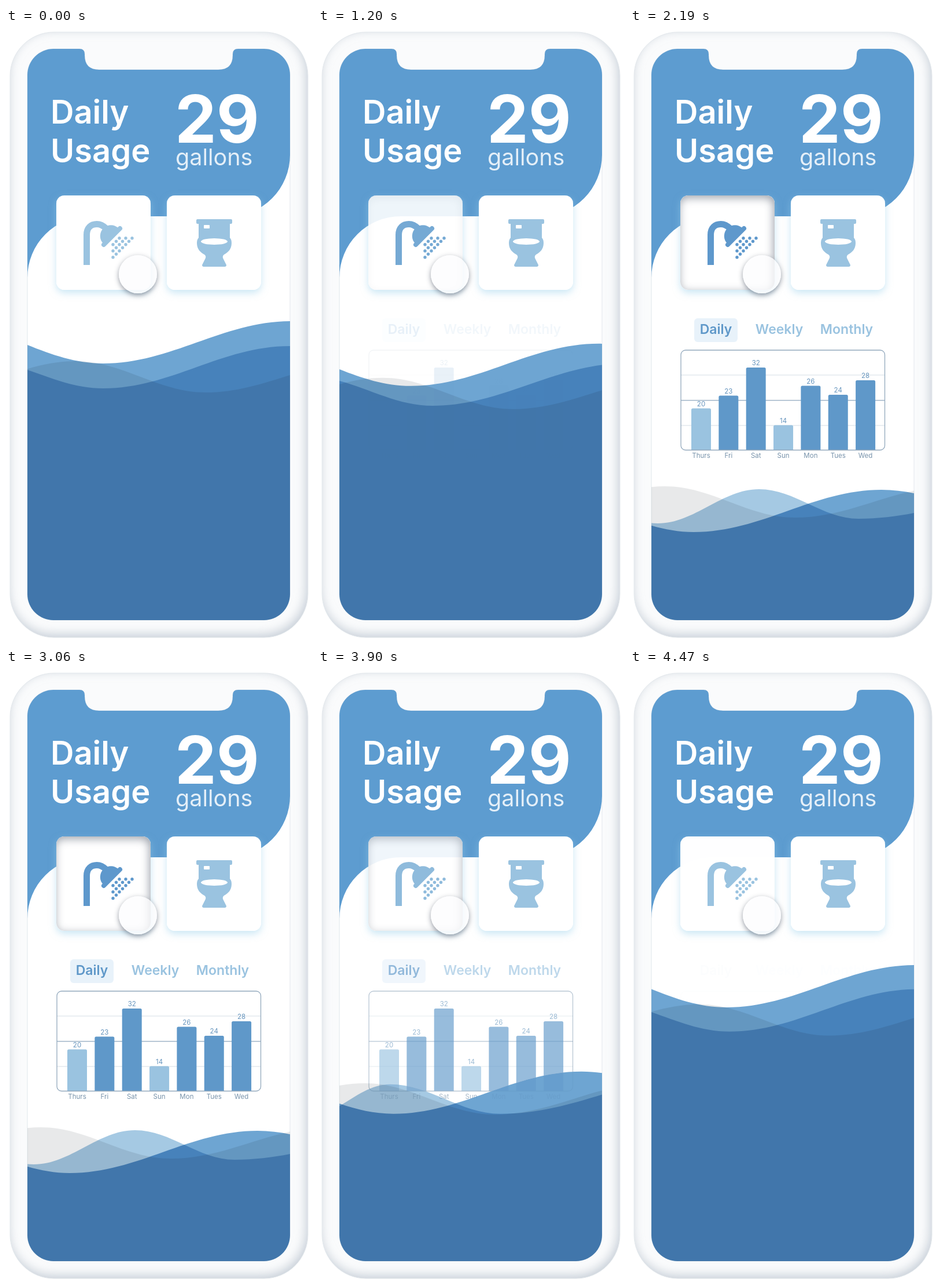
An HTML page with a canvas that plays this animation: 529 by 1058 pixels, repeating every 4.5 s.

```html
<!DOCTYPE html>
<html lang="en">
<head>
<meta charset="utf-8">
<title>Daily Usage</title>
<style>
html, body { margin: 0; width: 100%; height: 100%; overflow: hidden; background: #fff; }
canvas { display: block; width: 529px; height: 1058px; }
</style>
</head>
<body>
<canvas id="stage"></canvas>
<script>
const W = 529, H = 1058, LOOP = 4500, STEP = 30;
const FONT = 'Inter, "Liberation Sans", sans-serif';
const SKY = '#5d9cd0', DEEP = '#5f98c9', PALE = '#9ac3e0';

const canvas = document.getElementById('stage');
const ctx = canvas.getContext('2d');
const dpr = window.devicePixelRatio || 1;
canvas.width = W * dpr;
canvas.height = H * dpr;

const lerp = (a, b, k) => a + (b - a) * k;
const clamp = k => Math.max(0, Math.min(1, k));

// cubic-bezier(.42, 0, .58, 1)
function easeInOut(x) {
  x = clamp(x);
  let lo = 0, hi = 1;
  for (let i = 0; i < 24; i++) {
    const t = (lo + hi) / 2, u = 1 - t;
    if (1.26 * t * u * u + 1.74 * t * t * u + t * t * t < x) lo = t; else hi = t;
  }
  return lo * lo * (3 - 2 * lo);
}

function mix(a, b, k) {
  return `rgb(${a.map((v, i) => Math.round(lerp(v, b[i], k)))})`;
}

function roundRect(x, y, w, h, r) {
  const p = new Path2D();
  p.roundRect(x, y, w, h, r);
  return p;
}

function fill(path, color, alpha = 1) {
  ctx.save();
  ctx.globalAlpha *= alpha;
  ctx.fillStyle = color;
  ctx.fill(path);
  ctx.restore();
}

function stroke(path, color, width) {
  ctx.strokeStyle = color;
  ctx.lineWidth = width;
  ctx.stroke(path);
}

function text(str, x, y, size, color, weight = 400, align = 'left') {
  ctx.font = `${weight} ${size}px ${FONT}`;
  ctx.textAlign = align;
  ctx.fillStyle = color;
  ctx.fillText(str, x, y);
}

function setShadow(color, blur, dx, dy) {
  ctx.shadowColor = color;
  ctx.shadowBlur = blur * dpr;
  ctx.shadowOffsetX = dx * dpr;
  ctx.shadowOffsetY = dy * dpr;
}

function ring(path) {
  const p = new Path2D();
  p.rect(-200, -200, W + 400, H + 400);
  p.addPath(path);
  return p;
}

// Shadow only outside the path
function dropShadow(path, color, blur, dy) {
  ctx.save();
  ctx.clip(ring(path), 'evenodd');
  setShadow(color, blur, 0, dy);
  ctx.fillStyle = '#fff';
  ctx.fill(path);
  ctx.restore();
}

// Shadow only inside the path
function innerShadow(path, color, blur, dx, dy, alpha = 1) {
  ctx.save();
  ctx.clip(path);
  ctx.globalAlpha = alpha;
  setShadow(color, blur, dx, dy);
  ctx.fillStyle = '#fff';
  ctx.fill(ring(path), 'evenodd');
  ctx.restore();
}

const body = roundRect(7, 7, 515, 1045, 76);
const screen = new Path2D(`M82 36H127Q136 36 136 45V47Q136 72 161 72H367Q392 72 392 47V45
  Q392 36 401 36H446A45 45 0 0 1 491 81V977A45 45 0 0 1 446 1022H82A45 45 0 0 1 37 977V81A45 45 0 0 1 82 36Z`);
const header = new Path2D(`M30 30H498V219H491A106 106 0 0 1 385 325H143A106 106 0 0 0 37 431H30Z`);
const cards = [roundRect(87, 289, 163, 163, 14), roundRect(278, 289, 163, 163, 14)];
const pipe = new Path2D('M139.5 409V357C139.5 345 147 338.5 157 338.5C164 338.5 168 341 173 346');
const dome = new Path2D();
dome.arc(181.5, 359, 18.7, Math.PI * 0.75, Math.PI * 1.75);
const rim = new Path2D('M169 374L197 346');
const touch = new Path2D();
touch.arc(228, 425, 33, 0, 7);

const toilet = new Path2D(`M331 330H389Q391 330 391 332V336Q391 338 389 338H387V362Q390 365 390 371
  C390 382 384 387 377 391Q374 393 375 397L381 409Q381 412 378 412H342Q339 412 339 409L345 397
  Q346 393 343 391C336 387 330 382 330 371Q330 365 333 362V338H331Q329 338 329 336V332Q329 330 331 330Z`);
const seat = new Path2D();
seat.ellipse(360, 368.5, 23, 5.5, 0, 0, 7);

const bars = [['Thurs', 20, 656.5], ['Fri', 23, 634.5], ['Sat', 32, 586], ['Sun', 14, 685.5],
  ['Mon', 26, 617.5], ['Tues', 24, 633], ['Wed', 28, 608]];

function drawPhone() {
  fill(body, '#fafbfc');
  innerShadow(body, 'rgba(160,174,188,.6)', 18, -3, -5);
  stroke(body, '#e3e8ec', 1);
  fill(screen, '#fff');
  stroke(screen, '#e1e7ec', 1);
}

function drawHeader() {
  fill(header, SKY);
  text('Daily', 77, 164.5, 56, '#fff', 600);
  text('Usage', 77, 231.5, 56, '#fff', 600);
  text('29', 292, 198, 114, '#fff', 700);
  text('gallons', 293, 236.5, 39.5, '#e4eff8');
}

function drawShower(color) {
  stroke(pipe, color, 11);
  fill(dome, color);
  ctx.lineCap = 'round';
  stroke(rim, color, 8);
  ctx.lineCap = 'butt';
  ctx.fillStyle = color;
  for (let r = 0; r < 7; r++) {
    for (let c = 0; c < 7; c++) {
      const d = r + c;
      if (d < 2 || d > 6 || d % 2) continue;
      ctx.beginPath();
      ctx.arc(185 + 5.5 * c, 362.7 + 5.5 * r, 2.7, 0, 7);
      ctx.fill();
    }
  }
}

function drawCards(p, tone, leak) {
  for (const card of cards) dropShadow(card, 'rgba(150,208,235,.5)', 13, 5);
  fill(cards[0], '#fff', 1 - leak);
  innerShadow(cards[0], 'rgba(40,50,70,.45)', 15, -2, 4, p);
  fill(cards[1], '#fff');
  drawShower(mix([154, 195, 224], [94, 152, 204], tone));
  fill(toilet, PALE);
  fill(roundRect(342, 340, 10, 6, 1), '#fff');
  fill(seat, '#fff');
}

function drawTouch() {
  dropShadow(touch, 'rgba(40,50,70,.5)', 9, 3);
  fill(touch, '#fdfdfe', 0.75);
}

function drawChart(alpha) {
  if (alpha <= 0) return;
  ctx.save();
  ctx.globalAlpha = alpha;
  fill(roundRect(111, 501, 75, 41, 6), '#e8f2fa');
  text('Daily', 148.5, 527.5, 23, DEEP, 600, 'center');
  text('Weekly', 258, 527.5, 23, PALE, 600, 'center');
  text('Monthly', 374.5, 527.5, 23, PALE, 600, 'center');
  [599, 642.5, 686].forEach((y, i) => {
    ctx.fillStyle = i === 1 ? '#9fb4c7' : '#dce3e9';
    ctx.fillRect(88, y - 0.6, 353, i === 1 ? 1.5 : 1.2);
  });
  bars.forEach(([day, n, top], i) => {
    const x = 106 + 47.35 * i, mid = x + 17;
    fill(roundRect(x, top, 34, 728.5 - top, [2.5, 2.5, 0, 0]), n > 20 ? DEEP : PALE);
    text(n, mid, top - 4, 11.5, '#6594bd', 400, 'center');
    text(day, mid, 742, 11.5, '#7893ab', 400, 'center');
  });
  stroke(roundRect(88, 556, 352.5, 172.5, 8), '#93a9bd', 1.3);
  ctx.restore();
}

// Knots are crests and troughs, joined by half cosines
function wave(knots) {
  const path = new Path2D();
  path.moveTo(...knots[0]);
  for (let i = 1; i < knots.length; i++) {
    const [x0, y0] = knots[i - 1], [x1, y1] = knots[i], d = 0.3642 * (x1 - x0);
    path.bezierCurveTo(x0 + d, y0, x1 - d, y1, x1, y1);
  }
  path.lineTo(knots[knots.length - 1][0], H);
  path.lineTo(knots[0][0], H);
  return path;
}

function drawWaves(p) {
  let x = 345 - 60 * p, y = 629 + 216 * p;
  const mist = wave([[x - 475, y], [x - 225, y - 54], [x, y], [x + 272, y - 54], [x + 520, y]]);

  x = 168 + 227 * p;
  y = 622 + 225 * p;
  const crest = x - lerp(225, 172, p), dip = crest - lerp(100, 175, p), rise = x + lerp(322, 400, p);
  const light = wave([[dip - 200, y - 50], [dip, y + 8], [crest, y - 51], [x, y], [rise, y - 73], [rise + 300, y]]);

  x = 168 - 58 * p;
  y = 579 + 291 * p;
  const front = wave([[x - 285, y - 73], [x, y], [x + 325, y - 73], [x + 625, y]]);

  // Veil the chart behind the water before tinting
  fill(light, '#fff', 0.5);
  fill(front, '#fff', 0.85);
  ctx.save();
  ctx.globalCompositeOperation = 'multiply';
  fill(mist, '#e8e9ea');
  fill(light, '#a5c9e3');
  fill(front, '#6ea5d2');
  ctx.restore();
}

function draw(ms) {
  const back = ms >= 3425;
  const p = back ? 1 - easeInOut((ms - 3425) / 1152) : easeInOut((ms - 935) / 1043);
  const press = 0.55 * clamp((ms - 450) / 270);
  const tone = back ? p ** 4 : press + (1 - press) * p;
  const leak = p * (1 - p) * (back ? 0.4 : 1 - p);

  ctx.setTransform(dpr, 0, 0, dpr, 0, 0);
  ctx.fillStyle = '#fff';
  ctx.fillRect(0, 0, W, H);
  drawPhone();
  ctx.save();
  ctx.clip(screen);
  drawHeader();
  drawCards(p, tone, leak);
  drawChart(p);
  drawWaves(p);
  drawTouch();
  ctx.restore();
}

const start = performance.now();
function frame() {
  const ms = (performance.now() - start) % LOOP;
  draw(ms - ms % STEP);
  requestAnimationFrame(frame);
}
frame();
</script>
</body>
</html>
```
